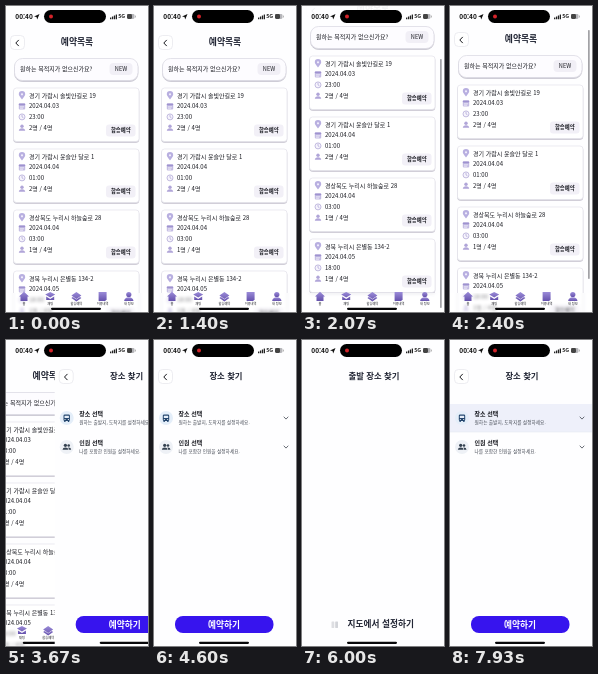
An HTML page that plays this animation: 142 px wide and 306 px high, repeating every 8 s.

```html
<!DOCTYPE html>
<html lang="ko">
<head>
<meta charset="utf-8">
<style>
  html, body { margin: 0; width: 100%; height: 100%; overflow: hidden; background: #fefeff; }
  svg { display: block; width: 100vw; height: 100vh; }
  text { font-family: "Noto Sans CJK KR", "Noto Sans CJK", "Noto Sans", sans-serif; }
  .line { fill: none; stroke-linecap: round; stroke-linejoin: round; }
</style>
</head>
<body>
<svg viewBox="0 0 142 306" preserveAspectRatio="none">
  <defs>
    <filter id="shadow" x="-10%" y="-10%" width="120%" height="130%">
      <feDropShadow dx="0" dy="1" stdDeviation=".7" flood-color="#77718c" flood-opacity=".42"/>
    </filter>
    <filter id="frost" filterUnits="userSpaceOnUse" x="0" y="270" width="142" height="36">
      <feGaussianBlur stdDeviation="1.8"/>
    </filter>
    <clipPath id="above"><rect width="142" height="287"/></clipPath>
    <clipPath id="below"><rect y="287" width="142" height="19"/></clipPath>
    <linearGradient id="violet" x2="0" y2="1">
      <stop stop-color="#9b8cd8"/><stop offset="1" stop-color="#6551ad"/>
    </linearGradient>
  </defs>
  <g id="list">
    <rect width="142" height="306" fill="#fefeff"/>
    <g clip-path="url(#above)"><g id="scroll"></g></g>
    <g clip-path="url(#below)"><g filter="url(#frost)"><use href="#scroll"/></g></g>
    <g id="tabs"></g>
    <rect id="thumb" x="138.2" width="1.4" height="249" rx=".7" fill="#8b8b90"/>
  </g>
  <g id="place"></g>
  <g id="departure"></g>
  <g id="status"></g>
</svg>
<script>
const $ = id => document.getElementById(id);
const LOOP = 8000;

const text = (x, y, size, label, { weight = 400, fill = '#17181f', anchor = 'start' } = {}) =>
  `<text x="${x}" y="${y + size * .36}" font-size="${size}" font-weight="${weight}" text-anchor="${anchor}" fill="${fill}">${label}</text>`;
const box = (x, y, w, h, r, fill, extra = '') =>
  `<rect x="${x}" y="${y}" width="${w}" height="${h}" rx="${r}" fill="${fill}" ${extra}/>`;
const line = (d, color, width = 1) =>
  `<path class="line" d="${d}" stroke="${color}" stroke-width="${width}"/>`;
const at = (x, y, content) => `<g transform="translate(${x} ${y})">${content}</g>`;
const title = (label, size, x = 72) =>
  text(x, 36, size, label, { weight: 700, anchor: 'middle', fill: '#222635' });
const backButton = box(4.5, 29.5, 14, 14, 4, '#fff', 'stroke="#e5e5eb" stroke-width=".7"') +
  line('M12.5 34.2L9.8 37L12.5 39.8', '#16171c');
const homeBar = box(45, 301.7, 50, 2.2, 1.1, '#08080a');

// Small line icons, centred on the origin.
const icons = {
  pin: '<path d="M0 4C-2 1-3.2 0-3.2-1.3A3.2 3.2 0 0 1 3.2-1.3C3.2 0 2 1 0 4Z" fill="#b8afe0"/><circle cy="-1.2" r="1.1" fill="#f2effc"/>',
  date: box(-3.2, -2.8, 6.4, 6.2, 1, '#c3bbe3') + box(-3.2, -2.8, 6.4, 1.8, .6, '#9e92cf') +
    line('M-1.7 .6H1.7M-1.7 2H.7', '#fff', .6),
  time: '<circle r="3" fill="#f6f4fc" stroke="#b5acd8" stroke-width=".8"/>' + line('M0-1.7V0L1.2 .8', '#9e92cf', .6),
  user: '<circle cy="-1.4" r="1.7" fill="#b0a5d8"/><path d="M-3.2 3.2Q-3 .6 0 .6T3.2 3.2Z" fill="#b0a5d8"/>'
};

const rides = [
  ['경기 가람시 솔빛안길로 19', '2024.04.03', '23:00', '2명 / 4명'],
  ['경기 가람시 윤슬안 달로 1', '2024.04.04', '01:00', '2명 / 4명'],
  ['경상북도 누리시 하늘숲로 28', '2024.04.04', '03:00', '1명 / 4명'],
  ['경북 누리시 은별동 134-2', '2024.04.05', '18:00', '1명 / 4명']
];

const card = (ride, i) => at(0, 82 + i * 61,
  box(7.5, 0, 125.5, 53.5, 3, '#fff', 'stroke="#dfdde8" stroke-width=".6" filter="url(#shadow)"') +
  ['pin', 'date', 'time', 'user'].map((name, row) => {
    const y = 7.5 + row * 10.7;
    return at(16, y, icons[name]) + text(23, y, 6, ride[row]);
  }).join('') +
  box(100, 36.5, 29.5, 12, 3, '#f2f0f7') +
  text(114.8, 42.5, 5.4, '합승예약', { weight: 700, anchor: 'middle' }));

$('scroll').innerHTML = backButton + title('예약목록', 8.8, 71) +
  box(8.5, 52.5, 123.5, 22, 8, '#fdfcff', 'stroke="#d9d7e1" stroke-width=".7" filter="url(#shadow)"') +
  text(14, 63, 6, '원하는 목적지가 없으신가요?') +
  box(103.5, 57, 23, 12, 4, '#f1eff6') +
  text(115, 63, 5.6, 'NEW', { weight: 500, anchor: 'middle' }) +
  rides.map(card).join('');

const tabs = [
  ['홈', '<path d="M-5 0L0-4.8L5 0H3.5V4.5H-3.5V0Z"/>'],
  ['채팅', '<path d="M-5-2L0-4.5L5-2L0 1ZM-4 0L0 2.4L4 0V3.5H-4Z"/>'],
  ['합승예약', '<path d="M-5-1L0-4.5L5-1L0 2.5ZM-5 1.5L0 5L5 1.5L3.6 .5L0 3L-3.6 .5Z"/>'],
  ['이용내역', '<path d="M-4-4.5H4V3L2.5 4.5H-4Z"/>'],
  ['내 정보', '<circle cy="-2" r="2.6"/><path d="M-4.7 4.5Q-4 .8 0 .8T4.7 4.5Z"/>']
];
$('tabs').innerHTML = box(0, 287, 142, 19, 0, '#fff', 'fill-opacity=".35"') +
  tabs.map(([label, shape], i) => at(18 + i * 26.2, 290.5, `<g fill="url(#violet)">${shape}</g>` +
    text(0, 7.7, 3.2, label, { anchor: 'middle', weight: 500 }))).join('') + homeBar;

const busIcon = box(-3.2, -3.6, 6.4, 6.6, 1.3, '#24466e') + box(-2.2, -2.3, 4.4, 2.4, .3, '#e5eef9') +
  box(-2.6, 2.4, 1.5, 1.6, .4, '#24466e') + box(1.1, 2.4, 1.5, 1.6, .4, '#24466e') +
  '<circle cx="-1.7" cy="1.5" r=".6" fill="#fff"/><circle cx="1.7" cy="1.5" r=".6" fill="#fff"/>';
const peopleIcon = '<g fill="#344150"><circle cx="-1.3" cy="-1.7" r="1.6"/><circle cx="2" cy="-1.5" r="1.3"/>' +
  '<path d="M-4.2 2.8Q-4 .4-1.3 .4T1.5 2.8ZM2.1 2.8Q2 1.3 1.4 .5Q4.3 .2 4.5 2.8Z"/></g>';
const option = (y, icon, tint, label, hint) => at(0, y,
  `<circle cx="12" r="7" fill="${tint}"/>` + at(12, 0, icon) +
  text(24.5, -4, 6, label, { weight: 700 }) + text(24.5, 4, 4.7, hint, { fill: '#484d57' }) +
  line('M130-1L132 1.1L134-1', '#444953', .8));

$('place').innerHTML = box(0, 0, 142, 306, 0, '#fefeff') + backButton + title('장소 찾기', 8.4) +
  `<g id="highlight">${box(0, 64, 142, 28, 0, '#eef0fa')}${line('M0 92H142', '#e1e4ef', .5)}</g>` +
  option(78, busIcon, '#e4eef9', '장소 선택', '원하는 출발지, 도착지를 설정하세요.') +
  option(107, peopleIcon, '#eef1f6', '인원 선택', '나를 포함한 인원을 설정하세요.') +
  box(21, 276, 98.5, 17, 8, '#3714ee') +
  text(70, 284.5, 8.7, '예약하기', { weight: 700, fill: '#fff', anchor: 'middle' }) + homeBar;

$('departure').innerHTML = box(0, 0, 142, 306, 0, '#fefeff') + title('출발 장소 찾기', 8.4) +
  box(29.5, 281.5, 2.8, 6.5, .4, '#dddee2') + box(33.2, 281.5, 2.8, 6.5, .4, '#d2d4d9') +
  text(45.5, 284, 8.7, '지도에서 설정하기', { weight: 700, fill: '#222635' }) + homeBar;

$('status').innerHTML = box(0, 0, 142, 20, 0, '#fefeff', 'fill-opacity=".94"') +
  text(9.3, 10.5, 6.5, '00:40', { weight: 700, fill: '#111' }) +
  '<path d="M28 10.6L33.5 8L31.2 13.4L30.5 11Z" fill="#111"/>' +
  box(38, 4, 62, 13, 6.5, '#000') + '<circle cx="45" cy="10.5" r="2" fill="#d32329"/>' +
  [0, 1, 2, 3].map(i => box(104 + i * 1.9, 11.5 - i, 1.3, 1.8 + i, .3, '#222')).join('') +
  text(112.2, 10.5, 5.4, '5G', { weight: 600, fill: '#222' }) +
  box(121, 8, 7.5, 5, 1.4, '#b5b5b9') + box(121, 8, 5, 5, 1.4, '#444') + box(129, 9.5, .7, 2, .3, '#999');

const easeInOut = p => p * p * (3 - 2 * p);
const easeOut = p => 1 - (1 - p) ** 3;
// Each step is [time, value]; values ease between neighbouring steps.
function sample(steps, t, ease = easeInOut) {
  const next = steps.findIndex(step => step[0] > t);
  if (next === 0) return steps[0][1];
  if (next < 0) return steps[steps.length - 1][1];
  const [t0, a] = steps[next - 1], [t1, b] = steps[next];
  return a + (b - a) * ease((t - t0) / (t1 - t0));
}

const scroll = [[1530, 0], [1950, 32], [2100, 32], [2400, 3], [2670, 0]];
const thumb = [[1530, 0], [1600, 1], [2530, 1], [2670, 0]];
const push = [[3530, 0], [4000, 1]];
const departure = [[5870, 0], [5990, 1], [7470, 1], [7630, 0]];
const highlight = [[7470, 0], [7500, 1]];

function draw(t) {
  const scrolled = sample(scroll, t);
  const pushed = sample(push, t, easeOut);
  const covered = sample(departure, t);
  $('scroll').setAttribute('transform', `translate(0 ${-scrolled})`);
  $('thumb').setAttribute('y', 21 + scrolled);
  $('thumb').style.opacity = sample(thumb, t);
  $('list').setAttribute('transform', `translate(${-43 * pushed} 0)`);
  $('place').setAttribute('transform', `translate(${142 * (1 - pushed)} 0)`);
  $('place').style.display = pushed ? '' : 'none';
  $('departure').style.opacity = covered;
  $('departure').style.display = covered ? '' : 'none';
  $('highlight').style.opacity = sample(highlight, t);
}

const start = performance.now();
function tick() {
  draw((performance.now() - start) % LOOP);
  requestAnimationFrame(tick);
}
tick();
</script>
</body>
</html>
```
